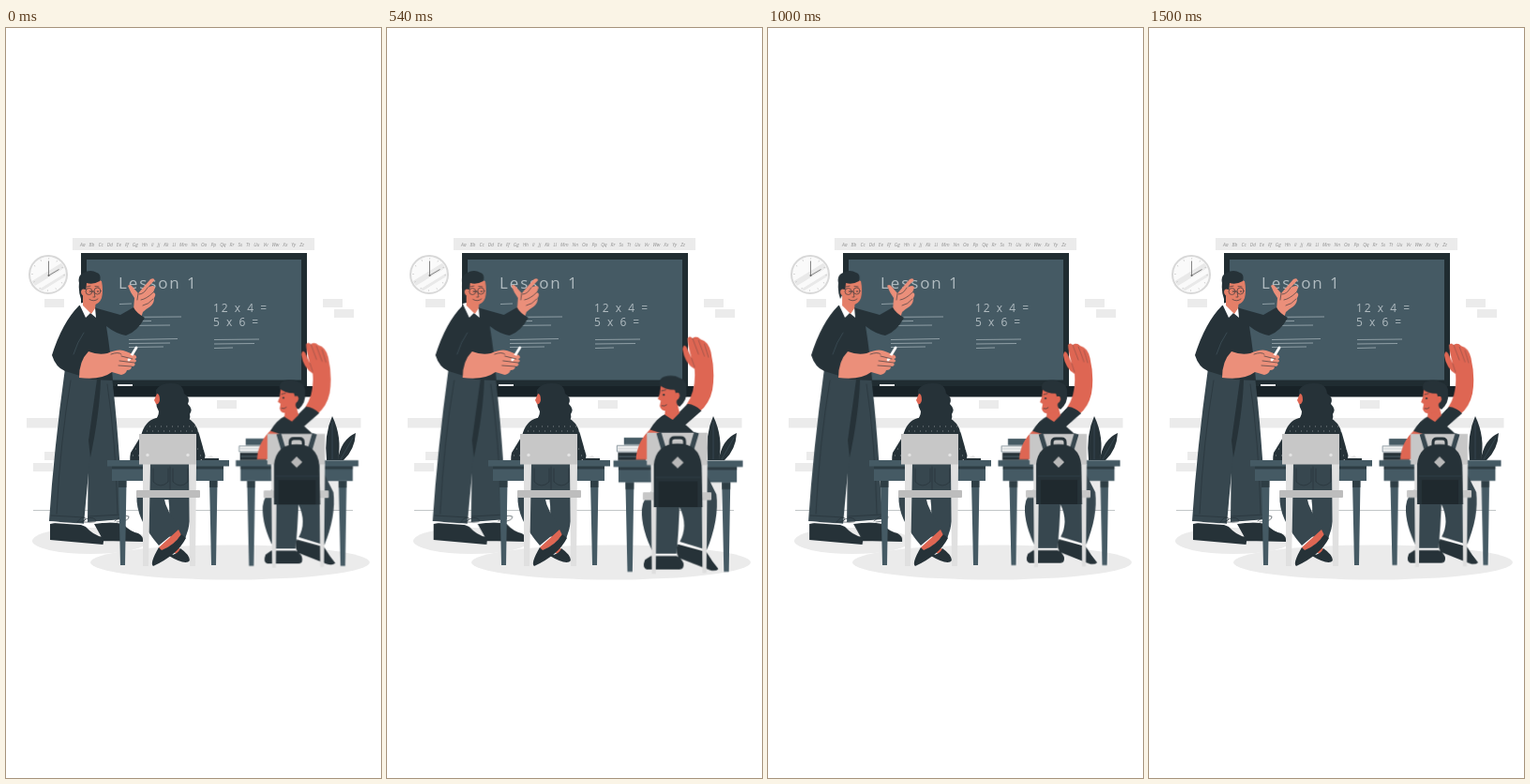
Write an HTML page that moves like this. It is 400 px wide and 800 px high and loops after 1540 ms.

```html
<!DOCTYPE html>
<html lang="en">
<head>
<meta charset="utf-8">
<title>Lesson 1</title>
<style>
  html, body { margin: 0; width: 100%; height: 100%; overflow: hidden; background: #fff; }
  svg { display: block; width: 100%; height: 100%; }
  text { font-family: "Open Sans", "Noto Sans", sans-serif; }

  .ink { fill: #263238; }
  .cloth { fill: #37474f; }
  .slate { fill: #455a64; }
  .pale { fill: #ebebeb; }
  .skin { fill: #eb8f7a; }
  .face { fill: #e47f68; }
  .tan { fill: #de6653; }
  .chalk { fill: #b1bcc1; }
  .line { fill: none; stroke: #263238; stroke-width: .6; stroke-linecap: round; stroke-linejoin: round; }
  .scribble { fill: none; stroke: #a3b0b6; stroke-width: .8; }

  /* 1500 ms of motion, then a 40 ms rest */
  #teacher { animation: shake 1540ms infinite; }
  #pupil { transform-origin: 310px 456px; animation: beat 1540ms infinite; }

  @keyframes shake {
    0%, 97.4%, 100% { transform: translateX(0); }
    9.74%, 87.7% { transform: translateX(-.85px); }
    19.5%, 77.9% { transform: translateX(1.7px); }
    29.2%, 48.7%, 68.2% { transform: translateX(-3.4px); }
    39%, 58.4% { transform: translateX(3.4px); }
  }
  @keyframes beat {
    0% { transform: scale(1.006); }
    13.6%, 41% { transform: scale(1.07); }
    27.3%, 68.2%, 100% { transform: scale(1); }
  }
</style>
</head>
<body>
<svg viewBox="0 0 400 800" xmlns="http://www.w3.org/2000/svg">
  <defs>
    <g id="desk">
      <path class="slate" d="M120 483h8.500l-1.500 90h-5zM217 483h8.500l-1.500 90h-5z"/>
      <path class="ink" d="M120 483h8.500v7h-8.500zM217 483h8.500v7h-8.500z" opacity=".7"/>
      <rect class="slate" x="113" y="467" width="119" height="16"/>
      <rect class="ink" x="113" y="467" width="119" height="3.500" opacity=".75"/>
      <rect class="slate" x="108" y="461" width="130" height="6.500"/>
    </g>
    <clipPath id="dial"><circle cx="45" cy="263" r="18.500"/></clipPath>
  </defs>

  <!-- Room -->
  <g class="pale">
    <rect x="22" y="416" width="356.500" height="10.500"/>
    <rect x="41" y="289" width="21" height="9"/>
    <rect x="338" y="289" width="21" height="9"/>
    <rect x="350" y="300" width="21" height="9"/>
    <rect x="225" y="397" width="21" height="9"/>
    <rect x="41" y="452" width="21" height="9"/>
    <rect x="29" y="464" width="21" height="9"/>
    <ellipse cx="90" cy="547" rx="62" ry="14"/>
    <ellipse cx="239" cy="570" rx="149" ry="18.500"/>
    <path d="M342 467h17l-3 48h-11z"/>
    <rect x="71" y="224" width="258" height="13"/>
  </g>
  <path d="M29 514.300H370" stroke="#263238" stroke-width=".5" opacity=".7"/>
  <text x="79" y="232.500" font-size="5" font-style="italic" fill="#8f8f8f" word-spacing="2.700">Aa Bb Cc Dd Ee Ff Gg Hh Ii Jj Kk Ll Mm Nn Oo Pp Qq Rr Ss Tt Uu Vv Ww Xx Yy Zz</text>

  <!-- Clock -->
  <circle cx="45" cy="263" r="20" fill="#fafafa" stroke="#d8d8d8" stroke-width="2"/>
  <g clip-path="url(#dial)" stroke="#e9e9e9">
    <path d="M22 277L66 250" stroke-width="6"/>
    <path d="M28 285L70 259" stroke-width="3"/>
  </g>
  <circle cx="45" cy="263" r="17" fill="none" stroke="#b5b5b5" stroke-width="1.500" stroke-dasharray=".6 8.301"/>
  <path d="M45.500 248.500V264L56.500 257.500" fill="none" stroke="#777" stroke-width=".9"/>
  <circle cx="45.500" cy="264" r="1" fill="#666"/>

  <!-- Blackboard -->
  <rect x="74" y="382" width="253.500" height="11.500" fill="#182227"/>
  <rect x="80" y="240" width="241" height="142" fill="#202c31"/>
  <rect class="slate" x="86" y="247" width="229" height="128.500"/>
  <path d="M119 381h16" stroke="#fff" stroke-width="1.800"/>
  <g class="chalk">
    <text x="120" y="278" font-size="17" letter-spacing="1.900">Lesson 1</text>
    <g font-size="12" letter-spacing="2">
      <text x="221" y="303">12 x 4 =</text>
      <text x="221" y="318">5 x 6 =</text>
    </g>
  </g>
  <path class="scribble" d="M121 294.500l13-.5M121 308.500l66-.5M125 313l30-.5M121 317.500l54-.5M131 332.500l52-1M131 336.500l44-.5M131 340.500l37-.5M222 332.500l48-.5M222 337l43-.5M222 341.500l20-.5"/>

  <!-- Teacher -->
  <g id="teacher">
    <path class="ink" d="M47 529Q68 524 85 532Q93 541 103 543Q105 547 103.500 551L47 546ZM94 529Q112 526 125 529Q132 537 141 539Q147 542 146 548L104 547Z"/>
    <path class="cloth" d="M85 365L113 372Q120 430 125 524L87 527L88 440Z"/>
    <path class="cloth" d="M63 363L98 374Q91 440 83 529L46 526Q51 450 63 363Z"/>
    <path class="ink" d="M97 375H101Q100 410 90 458L88 440Z"/>
    <path d="M47 527l36 2.500M88 528l37-2.500" stroke="#f5f5f5" stroke-width="1.500"/>
    <path class="line" d="M48 520l35 2M88 521l36-2M69 376Q58 440 54 518M108 380Q117 440 119 518"/>
    <path class="line" d="M76 527q5-7 9-4q0 4-9 4M82 526q8-6 13-2t-12 3M116 526q8-8 15-5q1 5-13 6"/>
    <path class="skin" d="M136 301L137 288Q133 283 130 275Q132 273 134 275L141 283L154 268Q158 266 158.500 269L151 277Q158 273 159 277L157 282Q161 283 158 288Q158 294 154 297Q149 300 146 303L144 309Z"/>
    <path class="ink" d="M78 296Q86 293 97 299L122 306L136 298Q139 304 148 309Q140 324 128 328Q117 326 107 318Q112 350 114 376L92 375L63 366Q53 362 49 349Q60 314 78 296Z"/>
    <path class="line" d="M83 325Q76 335 72 348" style="stroke:#455a64"/>
    <path d="M78 294L82 293L91 304L95 298L96 309L90 304L85 309Z" fill="#fff"/>
    <path class="face" d="M82 285L96 291L95 299L91 305L82 296Z"/>
    <path class="face" d="M83 268Q92 265 102 270Q104 280 102 288Q99 296 91 295Q84 291 82 283Z"/>
    <path class="ink" d="M80 289Q77 281 78 272Q76 264 83 261Q90 257 97 261Q102 263 100 270Q93 274 86 272L85 282L82 285Z"/>
    <path class="face" d="M85 279Q80 277 80 282Q81 287 86 286Z"/>
    <g class="line">
      <circle cx="88.500" cy="281" r="3.500"/>
      <circle cx="97.500" cy="280.500" r="3.500"/>
      <path d="M92 281h2M86 276l4-.8M95 275.500l4 .5M94 282l1 5h-2M89 289.500q5 3 9-.5"/>
    </g>
    <circle class="ink" cx="90" cy="281" r=".8"/>
    <circle class="ink" cx="98" cy="281" r=".8"/>
    <path class="line" d="M141 283l-1 7M142 284q5 0 9-7M144 290q6-1 13-8M146 296q6-1 11-7"/>
    <path class="skin" d="M88 345Q98 349 108 347Q121 341 128 345L138 349Q141 352 137 353Q141 355 137 357Q139 361 134 361Q134 365 129 365Q128 369 123 370L113 367Q101 376 78 373Q78 355 88 345Z"/>
    <path d="M131 354L139 341" stroke="#fff" stroke-width="2.800" stroke-linecap="round"/>
    <path class="skin" d="M122 347l12 2q3 2 0 3.500l-12-1z"/>
    <path class="line" d="M123 350l12 3M121 355l16 2M120 360l14 1M112 348q8-3 11 0"/>
  </g>

  <!-- Plant -->
  <path class="ink" d="M342 461Q339 434 348 414Q359 437 354 461ZM354 461Q357 439 373 432Q372 450 360 461Z"/>
  <path d="M348 420v40M370 437L357 460" stroke="#455a64" stroke-width=".5"/>

  <!-- Girl -->
  <path class="ink" d="M160 416H193Q202 419 206 433L212.500 456Q212 465 204 465L196 448H152L143 465H134Q131 462 133 453L144 435Q148 419 160 416Z"/>
  <path d="M153 425H203M150 430H205M138 449H212M135 456H214" stroke="#fff" stroke-width=".6" stroke-dasharray=".7 5.300"/>
  <path d="M207 461l12-5l5 4z" fill="#e8e8e8"/>
  <path class="ink" d="M209 459h18v2h-18z"/>
  <use href="#desk"/>
  <path class="cloth" d="M153 464H197L199 503H147Z"/>
  <path class="line" d="M157 470v14q8 8 16 0v-14M178 470v14q8 8 16 0v-14M175 468v24"/>
  <path class="cloth" d="M173 499H197Q199 525 191 545L172 542Q176 520 173 499Z"/>
  <path class="cloth" d="M139.500 499H168Q171 517 186 533L163 552Q138 523 139.500 499Z"/>
  <path class="tan" d="M163 554L184 535L187 541Q178 553 165 558ZM175 557l8-4l5 5l-6 3z"/>
  <path class="ink" d="M187 540L192 544Q183 562 157 574Q153 571 163 554L166 557Q179 552 187 540ZM172 562Q183 563 186 555Q196 562 196 568Q192 574 172 562Z"/>
  <path class="ink" d="M160 386Q165 378 177 379Q189 379 190 390Q197 394 194 401Q200 407 196 412Q198 419 190 421Q179 427 169 421L157 420Q163 415 163 409Q160 404 160 398Z"/>
  <path class="tan" d="M161 390Q164 390 164 397Q163 402 160 401L158 397Z"/>
  <path d="M146 465h8l-2 109h-6zM195 465h8l-1 109h-6z" fill="#e0e0e0"/>
  <rect x="142" y="433" width="61" height="32.500" fill="#c7c7c7"/>
  <rect x="139" y="493" width="68" height="8" rx="1" fill="#bdbdbd"/>
  <circle cx="151" cy="455.500" r="1.700" fill="#e3e3e3"/>
  <circle cx="194" cy="455.500" r="1.700" fill="#e3e3e3"/>

  <!-- Boy -->
  <g id="pupil">
    <path class="slate" d="M256 438h24v7h-24z"/>
    <path d="M249 446h24v6h-24z" fill="#f5f5f5" stroke="#455a64" stroke-width=".6"/>
    <path d="M250 449h20" stroke="#90a0a8" stroke-width=".5"/>
    <path class="ink" d="M250 453h28v8h-28z"/>
    <path d="M251 457h22" stroke="#78909c" stroke-width=".5"/>
    <path class="tan" d="M284 428L296 434L281 441L280 460H268Q269 441 284 428Z"/>
    <path class="tan" d="M319 405Q329 390 327 369Q317 363 315 349Q316 343 319 347L324 358Q320 344 320 338Q322 335 325 338Q329 335 333 339Q341 341 343.500 352Q348 372 345 390Q342 404 332 412Z"/>
    <path class="line" d="M324 358l3 9M325 338l6 16M331 340l6 16M337 344l4 13" opacity=".45"/>
    <path class="ink" d="M282 430Q289 418 298 414L311 413L320 404Q328 405 334 411L318 425L328 434V466H290L295 434Z"/>
    <path class="tan" d="M298 405h12l2 8l-7 7l-8-5z"/>
    <path class="tan" d="M293 386Q302 380 312 386L314 398Q311 410 302 411Q293 412 292 406L293 401L290 399L292 394Z"/>
    <path class="ink" d="M292 385Q291 379 296 377Q305 374 312 378Q320 380 319 390Q320 400 312 407Q307 405 310 398L307 390Q297 390 292 385Z"/>
    <path class="tan" d="M307 394q5-3 5 2q-1 5-5 4z"/>
    <path class="line" d="M294 391l4-1M294 406q3 1 5-1"/>
    <circle class="ink" cx="296" cy="395" r="1"/>
    <use href="#desk" x="137.500"/>
    <path class="cloth" d="M286 473H338L349 495Q352 520 339 552L312 543Q321 527 312 508Q311 532 309 555H286Q273 530 274 510Q275 498 286 490Z"/>
    <path d="M285 555.500h24M311 543l29 9" stroke="#f5f5f5" stroke-width="1.500"/>
    <path class="ink" d="M283 557H309Q316 561 316 566Q316 571 311 570.500H279Q274 569 277 561ZM310 545L339 553Q345 563 351 570Q348 573 342 571L311 559Q308 553 310 545Z"/>
    <path d="M283 465h6l-1 110h-4zM334 465h6l-1 109h-4z" fill="#dedede"/>
    <rect x="279" y="433" width="61" height="32.500" fill="#c7c7c7"/>
    <rect x="275" y="493" width="69" height="8" rx="1" fill="#c7c7c7"/>
    <path d="M291 433l6 20M329 433l-6 20" stroke="#37474f" stroke-width="5"/>
    <path d="M303 447v-5q0-4 4-4h6q4 0 4 4v5" fill="none" stroke="#263238" stroke-width="3"/>
    <path class="ink" d="M286 508V466Q288 444 310 444T334 466L335 508Z"/>
    <path d="M291 508V482H330V508Z" fill="#1f292e"/>
    <path class="line" d="M288 478H333" style="stroke:#37474f"/>
    <path d="M310 457l6 6-6 6-6-6z" fill="#b8b8b8"/>
  </g>
</svg>
</body>
</html>
```
